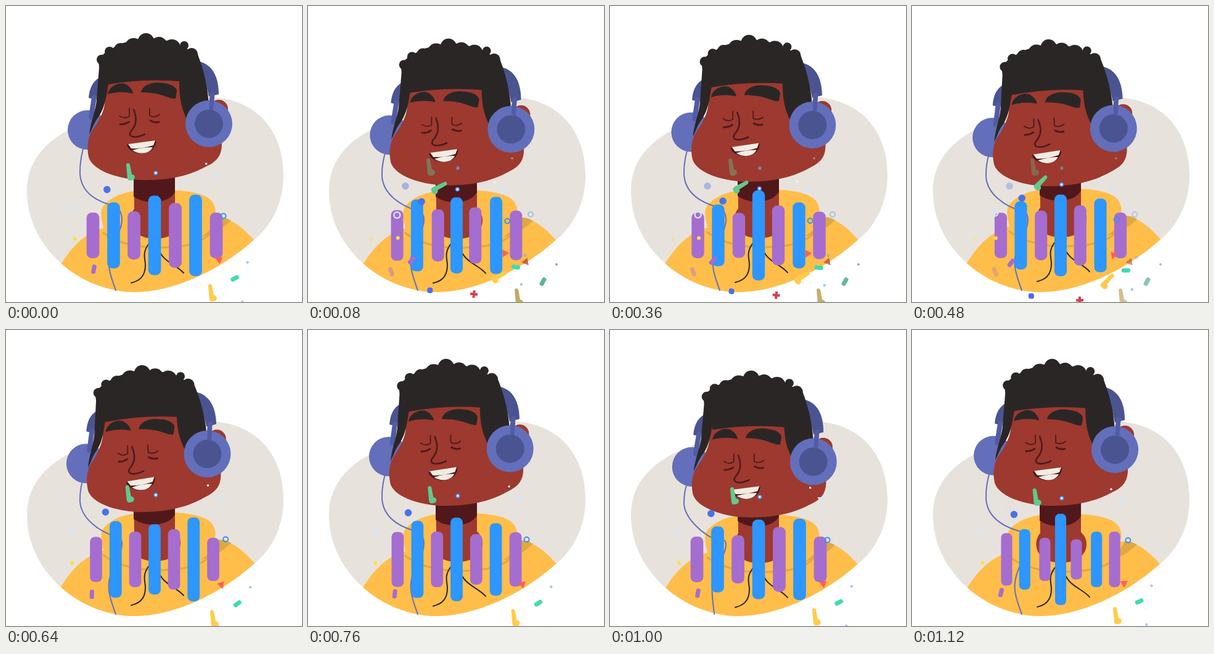
These frames come from a looping animation (480x480 px, 1160 ms). An HTML page:

```html
<!DOCTYPE html>
<html>
<head>
<meta charset="utf-8">
<style>
  html, body { margin: 0; height: 100%; overflow: hidden; background: #fff; }
  svg { display: block; width: 100vw; height: 100vh; }
  .line { fill: none; stroke-linecap: round; stroke-linejoin: round; }
</style>
</head>
<body>
<svg viewBox="0 0 480 480">
  <defs>
    <path id="blob" d="M34 300C34 255 60 222 104 200C180 165 270 140 345 149C410 157 450 205 450 275C450 335 415 370 400 381C345 430 270 464 208 464C165 464 120 445 90 418C50 382 34 340 34 300Z"/>
    <clipPath id="inside"><use href="#blob"/></clipPath>
  </defs>
  <use href="#blob" fill="#e8e2dc"/>

  <g clip-path="url(#inside)"><g id="body">
    <path fill="#ffbe4a" d="M86 424C105 392 125 370 158 360C154 345 152 332 158 324C175 305 200 298 240 298C290 297 325 303 335 318C341 328 340 336 338 343C365 340 390 365 406 384V480H86Z"/>
    <path fill="#dfa843" d="M345 343Q356 342 365 348Q345 368 316 375Q335 362 345 343Z"/>
    <path class="line" stroke="#dfa843" stroke-width="3" d="M158 368C190 391 235 394 265 391C295 390 318 384 332 368"/>
    <path fill="#9d392f" d="M207 260H274V328C286 338 286 357 274 367C258 381 226 381 210 367C199 357 199 340 208 329Z"/>
    <path fill="#51181b" d="M207 260H274V302C262 322 225 322 207 309Z"/>
    <g class="line" stroke="#2b2626" stroke-width="2">
      <path d="M232 385C220 400 226 410 226 420C226 440 215 446 203 449"/>
      <path d="M246 390C252 415 275 418 288 433"/>
    </g>
  </g></g>

  <g id="head">
    <path fill="#4a5490" d="M152 116C140 122 135 135 134 149L146 152L152 130Z"/>
    <circle cx="132" cy="201" r="32" fill="#636fbb"/>
    <path class="line" stroke="#525ca4" stroke-width="8" d="M143 148L138 180"/>
    <circle cx="345" cy="167" r="15" fill="#9d392f"/>
    <path fill="#4a5490" d="M313 90C335 95 345 115 345 143L329 147L322 115Z"/>
    <path fill="#9d392f" d="M152 115H288L300 180L349 210C353 240 345 251 323 261C288 280 250 283 215 282C175 279 140 265 134 245C130 225 134 210 141 200C152 185 162 165 160 150Z"/>
    <g fill="#2b2626">
      <path d="M135 208C137 188 147 165 147 150L151 100L150 85L165 72L190 60L227 50L260 56L310 76C325 115 328 140 329 165L300 195C284 170 281 150 281 122Q225 117 166 127C162 150 160 165 150 180C142 190 140 200 135 208Z"/>
      <g id="curls"/>
    </g>
    <g id="face">
      <g fill="#2b2626">
        <path d="M160 85H290L282 122Q225 117 165 127Z"/>
        <path d="M165 143C167 129 185 122 195 127C203 132 206 139 206 142C190 138 175 140 165 143Z"/>
        <path d="M219 140C221 127 240 122 255 125C269 126 277 133 277 138L275 150C264 152 255 140 219 140Z"/>
      </g>
      <g class="line" stroke="#4f1a1c" stroke-width="1.8">
        <path d="M184 178Q192 184 200 179V166M249 176Q241 182 233 178V166"/>
        <path stroke-width="3" d="M185 192Q193 192 199 188M234 186Q241 190 248 188"/>
        <path stroke-width="2.6" d="M207 168C214 185 210 195 202 204C197 213 210 215 225 208"/>
      </g>
      <path fill="#4b1518" d="M196 225L243 218C244 232 230 240 217 239C206 238 197 232 196 225Z"/>
      <path fill="#f2ede4" d="M198 224L242 218L239 226Q220 232 203 231ZM205 234Q220 229 238 229C232 241 215 241 205 234Z"/>
    </g>
    <path class="line" stroke="#525ca4" stroke-width="7" d="M335 142L331 165"/>
    <circle cx="329" cy="191" r="38" fill="#636fbb"/>
    <circle cx="329" cy="191" r="23" fill="#4a5490"/>
    <path class="line" stroke="#525ca4" stroke-width="7" d="M335 142L333 166"/>
  </g>
  <path id="cord" class="line" stroke="#636fbb" stroke-width="2"/>
  <g id="bars"/>
  <g id="confetti"/>
</svg>

<script>
const $ = id => document.getElementById(id);
function add(parent, tag, attrs) {
  const el = document.createElementNS('http://www.w3.org/2000/svg', tag);
  return set(parent.appendChild(el), attrs);
}
function set(el, attrs) {
  for (const k in attrs) el.setAttribute(k, attrs[k]);
  return el;
}

const LOOP = 1160, STEP = 40;
const ease = f => (1 - Math.cos(Math.PI * f)) / 2;

// Finds the span of `times` around t: index and fraction.
function span(times, t) {
  let i = 0;
  while (t >= times[i + 1]) i++;
  return [i, (t - times[i]) / (times[i + 1] - times[i])];
}
const mix = (a, b, f) => a + (b - a) * f;
function tween(times, values, t, curve = f => f) {
  const [i, f] = span(times, t);
  return mix(values[i], values[i + 1], curve(f));
}

for (const [cx, cy, r] of [[155, 87, 8], [168, 74, 8], [186, 71, 11], [207, 66, 14],
  [227, 57, 13], [248, 63, 13], [269, 68, 14], [289, 64, 7], [301, 78, 10]])
  add($('curls'), 'circle', { cx, cy, r });

// Each pose: outer offset, inner offset, then the half heights of the bars.
const beats = [0, 200, 360, 640, 840, 1000, 1120, LOOP];
const rest = [100, 33.5, 37, 53.5, 39, 64.5, 52.5, 66, 37];
const poses = [
  rest,
  [91, 25.5, 47, 65.5, 47, 57.5, 35, 57.5, 45],
  [98.5, 32, 37, 50, 36.5, 73, 48.5, 53.5, 38.5],
  [95, 31.5, 36.5, 62, 45, 57, 49, 68, 35],
  [96, 32, 50, 63, 45, 75, 35.5, 52.5, 50],
  rest,
  [87.5, 25.5, 42.5, 49, 35, 74, 32.5, 45, 45],
  rest
];
const bars = Array.from({ length: 7 }, (_, i) =>
  add($('bars'), 'rect', { fill: i % 2 ? '#2d96ff' : '#a56dd0' }));

function drawBars(t) {
  const [i, f] = span(beats, t);
  const [outer, inner, ...halves] = poses[i].map((v, j) => mix(v, poses[i + 1][j], f));
  const offsets = [0, inner, outer * .665, outer];
  const width = outer * .207;
  bars.forEach((bar, j) => {
    const x = 241 + Math.sign(j - 3) * offsets[Math.abs(j - 3)];
    set(bar, { x: x - width / 2, y: 372 - halves[j], width, height: halves[j] * 2, rx: width * .4 });
  });
}

const disc = r => `M${-r} 0a${r} ${r} 0 1 0 ${2 * r} 0a${r} ${r} 0 1 0 ${-2 * r} 0Z`;
const pill = (w, h) => {
  const r = Math.min(w, h) * .4;
  return `M${r - w / 2} ${-h / 2}h${w - 2 * r}q${r} 0 ${r} ${r}v${h - 2 * r}q0 ${r} ${-r} ${r}` +
    `h${2 * r - w}q${-r} 0 ${-r} ${-r}v${2 * r - h}q0 ${-r} ${r} ${-r}Z`;
};
const note = 'M-8 -13q3 -4 6 0l3 16a6 5 0 1 1 -2 10q-4 1 -5 -4Z';
const cross = 'M-2 -6h4v4h4v4h-4v4h-4v-4h-4v-4h4Z';
const triangle = 'M-6 -5H6L0 6Z';
const noteTurn = a => Math.max(0, .7 - a) * 270;
const spin = angle => a => angle + 120 * (1 - a);

// End offset from the centre, path, colour, then optional turn, ring width and ring filling.
const kinds = [
  [-41, -110, note, '#62c98f', noteTurn],
  [2, -109, disc(2.6), '#4a9cf5', null, 1.8, '#fff'],
  [109, -103, triangle, '#d6e5f3', spin(-30)],
  [90, -125, disc(1.8), '#f3f5f9'],
  [120, -34, disc(4), '#3a92ee', null, 2, 'none'],
  [113, 44, triangle, '#ff5d5a', spin(-40)],
  [140, 75, pill(14, 7), '#42dbb0', spin(-60)],
  [162, 47, disc(1.4), '#3a92ee', null, 1, '#fff'],
  [102, 101, note, '#ffcb4a', noteTurn],
  [153, 116, disc(1.4), '#3a92ee', null, 1, '#fff'],
  [41, 139, cross, '#d63f50', spin(-60)],
  [-63, 130, pill(9, 9), '#4a6cf0', spin(-60)],
  [-106, 59, pill(7, 15), '#a56dd0', spin(-22)],
  [-139, 6, disc(3), '#ffe03d'],
  [-141, -48, disc(5), '#d9e7f5', null, 2.4, 'none'],
  [-83, -80, disc(5.8), '#4a72e8']
];
const makeBurst = () => kinds.map(([x, y, d, color, turn, ring, filling]) => ({
  x, y, turn,
  outside: x + y > 150,
  el: add($('confetti'), 'path', ring
    ? { d, fill: filling, stroke: color, 'stroke-width': ring }
    : { d, fill: color })
}));
const oldBurst = makeBurst(), newBurst = makeBurst();

// Running count of bursts; its fraction is the progress of the current one.
const counts = [.592, 1.954, 3.154, 5.69, 7.277, 8.592, 9.54, 9.87];

function drawBurst(burst, age, opacity, fade) {
  const reach = 1 - (1 - age) ** 2;
  for (const { x, y, turn, outside, el } of burst) {
    const angle = turn ? turn(age) : 0;
    set(el, {
      transform: `translate(${241 + x * reach} ${372 + y * reach}) rotate(${angle})`,
      opacity: outside ? opacity : opacity * (1 - .45 * fade)
    });
    el.style.filter = outside ? `brightness(${1 - .3 * fade})` : '';
  }
}

function drawConfetti(t) {
  const progress = tween(beats, counts, t) % 1;
  drawBurst(oldBurst, 1, Math.max(0, 1 - progress * 1.8), 1);
  drawBurst(newBurst, mix(.35, 1, progress), 1, Math.max(0, progress - .8) / .2);
}

function drawPerson(t) {
  const dip = tween([0, 180, 385, 580, 730, 990, LOOP], [0, 21, 2, 18, 2, 22, 0], t, ease);
  const lean = tween([0, 180, 580, 990, LOOP], [0, 2, -7, 2, 0], t, ease);
  const degrees = lean / 235 * 180 / Math.PI;
  set($('head'), { transform: `translate(0 ${dip}) rotate(${degrees} 240 280)` });
  // The features slide down the face as the head nods.
  set($('face'), { transform: `translate(0 ${dip * .62})` });
  set($('body'), { transform: `translate(0 ${lean * .4})` });
  const end = 178 - Math.max(0, dip - 13);
  set($('cord'), {
    d: `M136 ${185 + dip}C128 ${225 + dip} 119 ${245 + dip / 2} 120 ${272 + dip * .5}` +
      `C122 305 150 ${318 + dip * .7} 178 ${325 + dip * .8}` +
      `C192 335 190 355 180 372C160 410 165 425 ${end} 461`
  });
}

function frame(now) {
  const t = Math.floor(now / STEP) * STEP % LOOP;
  drawPerson(t);
  drawBars(t);
  drawConfetti(t);
  requestAnimationFrame(frame);
}
frame(0);
</script>
</body>
</html>
```
